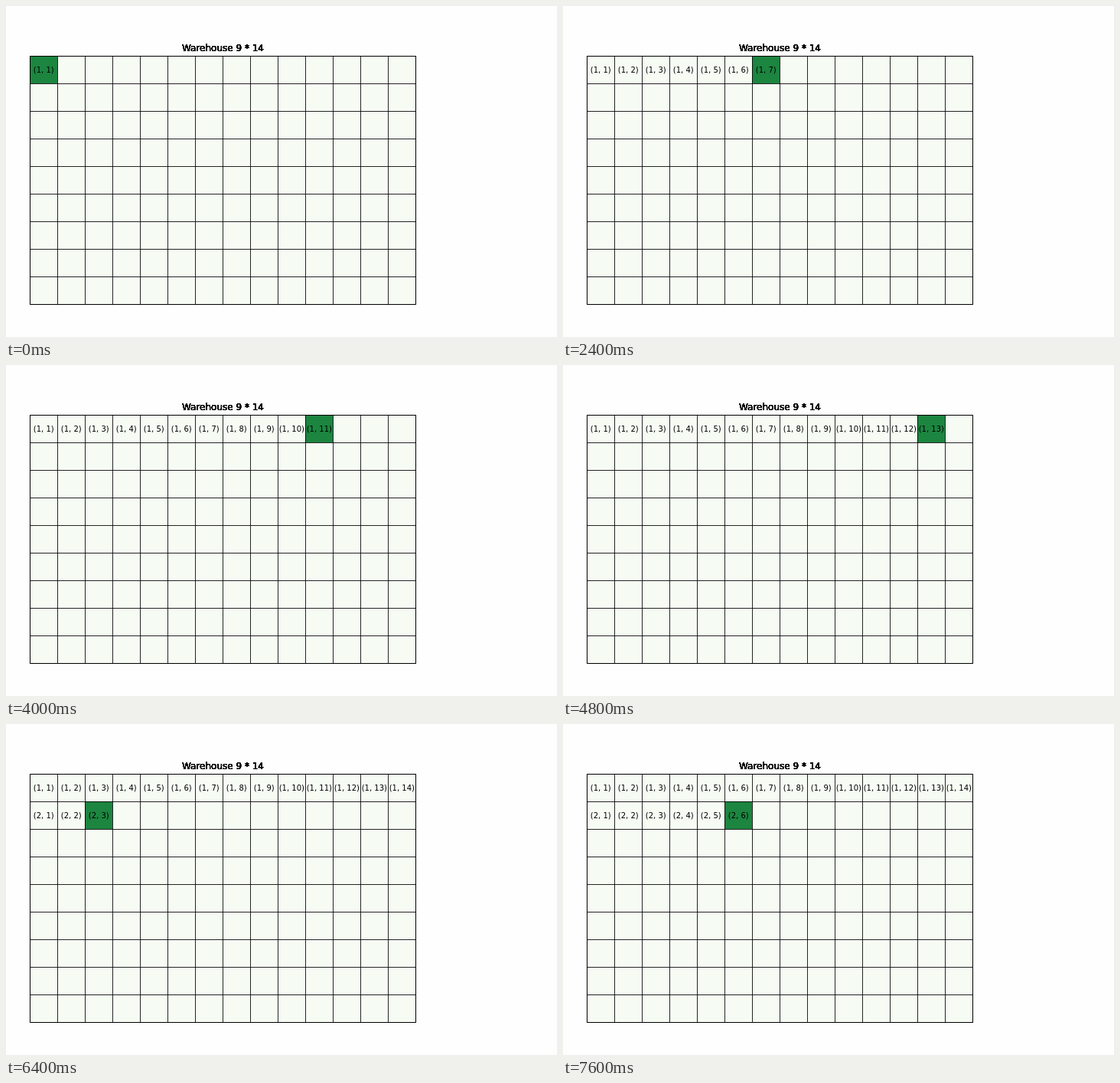
Write an HTML page that moves like this. It is 720 by 432 pixels and loops after 8 s.

```html
<!DOCTYPE html>
<html lang="en">
<head>
<meta charset="utf-8">
<title>Warehouse grid</title>
<style>
  html, body { margin: 0; width: 100%; height: 100%; overflow: hidden; background: #fefefe; }
  svg { display: block; }
  text { font: 10px "DejaVu Sans", sans-serif; text-anchor: middle; fill: #000; }
  .title { font-size: 12px; }
</style>
</head>
<body>
<svg id="stage" width="720" height="432" viewBox="0 0 720 432"></svg>
<script>
const ROWS = 9, COLS = 14, SIZE = 36, LEFT = 31, TOP = 65;
const STEP = 400, STEPS = 20;
const WIDTH = COLS * SIZE, HEIGHT = ROWS * SIZE;
const stage = document.getElementById('stage');

function add(tag, attrs, text = '') {
  const el = document.createElementNS('http://www.w3.org/2000/svg', tag);
  for (const key in attrs) el.setAttribute(key, attrs[key]);
  el.textContent = text;
  return stage.appendChild(el);
}

add('rect', { x: LEFT, y: TOP, width: WIDTH, height: HEIGHT, fill: '#f6fbf4' });
const marker = add('rect', { width: SIZE, height: SIZE, fill: '#1c8540' });

let lines = '';
for (let c = 1; c < COLS; c++) lines += `M${LEFT + c * SIZE + .5} ${TOP}v${HEIGHT}`;
for (let r = 1; r < ROWS; r++) lines += `M${LEFT} ${TOP + r * SIZE + .5}h${WIDTH}`;
add('path', { d: lines, stroke: '#000', 'stroke-opacity': .85 });
add('rect', { x: LEFT + .5, y: TOP + .5, width: WIDTH, height: HEIGHT, fill: 'none', stroke: '#000' });

// Repeated drawing hardens the soft edges of the title.
for (let i = 0; i < 8; i++) add('text', { class: 'title', x: 283.5, y: 59 }, 'Warehouse 9 * 14');

const place = i => ({ row: Math.floor(i / COLS), col: i % COLS });
const labels = Array.from({ length: STEPS }, (_, i) => {
  const { row, col } = place(i);
  return add('text', { x: LEFT + col * SIZE + 18.3, y: TOP + row * SIZE + 22 }, `(${row + 1}, ${col + 1})`);
});

function draw(time) {
  const step = Math.floor(time / STEP) % STEPS;
  const { row, col } = place(step);
  marker.setAttribute('x', LEFT + col * SIZE);
  marker.setAttribute('y', TOP + row * SIZE);
  labels.forEach((label, i) => label.setAttribute('visibility', i <= step ? 'visible' : 'hidden'));
}

function tick(now) {
  draw(now);
  requestAnimationFrame(tick);
}
draw(0);
requestAnimationFrame(tick);
</script>
</body>
</html>
```
